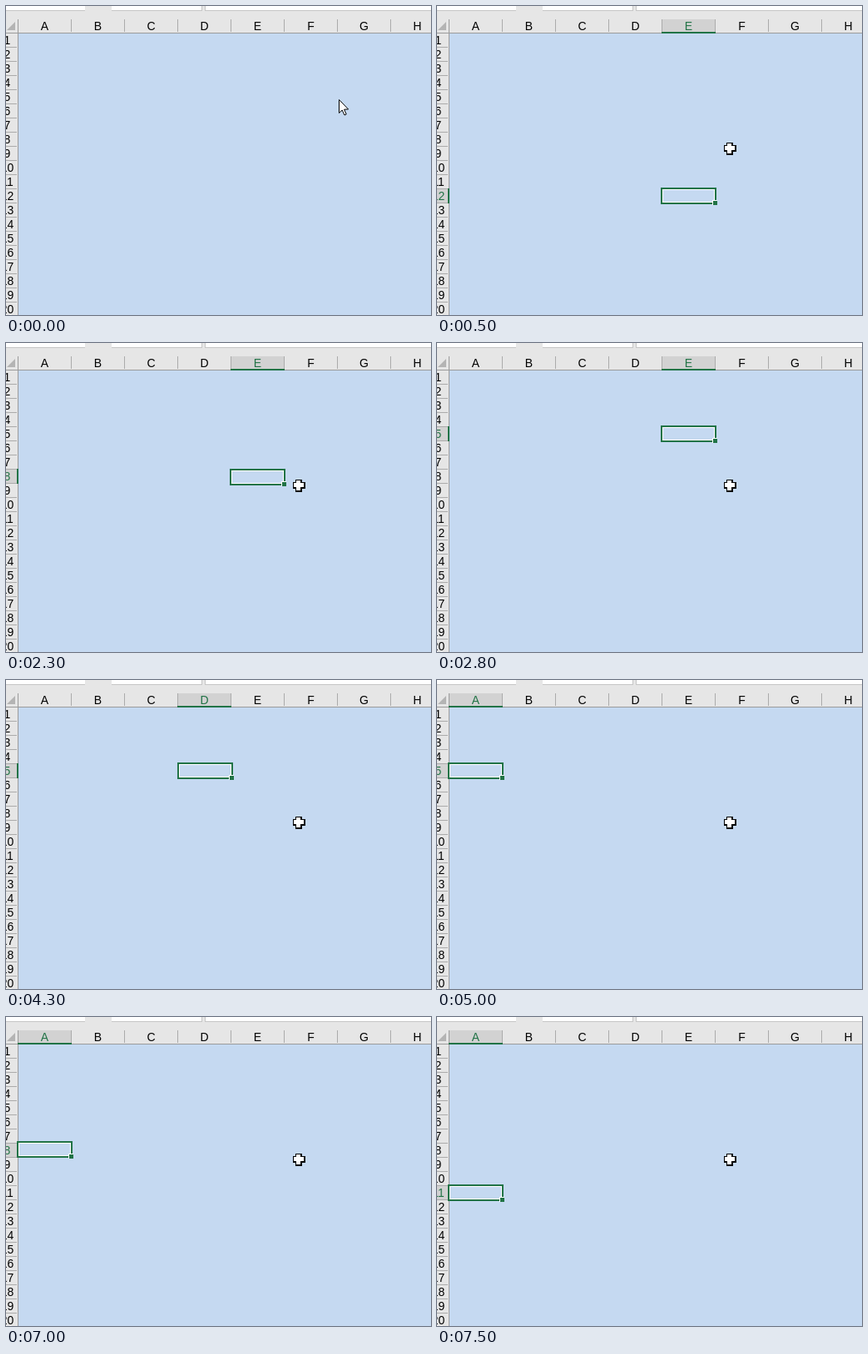
An HTML page with a canvas for the animation above (8000 ms loop, 511 by 371 pixels).

```html
<!DOCTYPE html>
<html lang="en">
<head>
<meta charset="utf-8">
<title>Moving the active cell</title>
<style>
html, body { margin: 0; width: 100%; height: 100%; overflow: hidden; background: #c5d9f1; }
canvas { display: block; }
</style>
</head>
<body>
<canvas id="stage" width="511" height="371"></canvas>
<script>
const ctx = document.getElementById('stage').getContext('2d', { alpha: false });
const LOOP = 8000, COL_W = 64, ROW_H = 17, LEFT = 14, TOP = 32;
const GREEN = '#217346', HEADER = '#e6e6e6', LINE = '#ababab', EDGE = '#9b9b9b';

// Key presses: each selection lands one pixel short, then settles 100 ms later.
const moves = [{ at: 300, col: 4, row: 11, dx: 0, dy: 0 }];
function press(times, dx, dy) {
  for (const at of times) {
    const { col, row } = moves[moves.length - 1];
    moves.push({ at, col: col + dx, row: row + dy, dx, dy });
  }
}
press([1800, 2000, 2200, 2300, 2500, 2600, 2700], 0, -1);
press([4300, 4500, 4700, 4900], -1, 0);
press([6600, 6800, 7000, 7100, 7300, 7400], 0, 1);

const pointer = [
  { at: 0, x: 400, y: 112, arrow: true },
  { at: 100, x: 362, y: 159 },
  { at: 200, x: 308, y: 221 },
  { at: 300, x: 308, y: 221 },
  { at: 400, x: 338, y: 187 },
  { at: 500, x: 352, y: 171 }
];

const current = (steps, t) => steps.filter(s => s.at <= t).pop();
const colX = c => LEFT + c * COL_W;
const rowY = r => TOP + r * ROW_H;

function box(color, x, y, w, h) {
  ctx.fillStyle = color;
  ctx.fillRect(x, y, w, h);
}

function label(text, x, y, color) {
  ctx.fillStyle = color;
  ctx.fillText(text, x, y);
}

function polygon(points) {
  ctx.beginPath();
  points.forEach(([x, y]) => ctx.lineTo(x, y));
  ctx.closePath();
}

function drawSheet(cell) {
  box('#c5d9f1', 0, 0, 511, 371);
  box(HEADER, 0, 0, 511, TOP);
  box(HEADER, 0, TOP, LEFT, 371 - TOP);

  for (const [x, w] of [[0, 95], [127, 109], [240, 271]]) {
    box('#ffffff', x, 0, w, 5);
    box('#c6c6c6', x, 5, w, 1);
  }
  box('#c6c6c6', 235, 0, 1, 6);
  box('#c6c6c6', 239, 0, 1, 6);

  ctx.fillStyle = '#b4b4b4';
  polygon([[11, 19], [11, 29], [1, 29]]);
  ctx.fill();

  box(EDGE, 0, TOP, 511, 1);
  box(EDGE, LEFT, 16, 1, 355);

  ctx.font = '14px "Liberation Sans", Arial, sans-serif';
  ctx.textAlign = 'center';
  for (let c = 0; c < 8; c++) {
    const x = colX(c), active = cell && cell.col === c;
    if (active) {
      box('#d2d2d2', x + 1, 16, COL_W - 1, 15);
      box(GREEN, x, 31, COL_W + 1, 2);
    }
    box(LINE, x + COL_W, 16, 1, 15);
    label('ABCDEFGH'[c], x + 32.5, 29, active ? GREEN : '#000');
  }
  for (let r = 0; r < 20; r++) {
    const y = rowY(r), active = cell && cell.row === r;
    if (active) {
      box('#d2d2d2', 0, y + 1, 13, ROW_H - 1);
      box(GREEN, 13, y, 2, ROW_H + 1);
    }
    box(LINE, 0, y + ROW_H, 13, 1);
    label(r + 1, 1.5, y + 14, active ? GREEN : '#000');
  }
}

function drawSelection(cell, t) {
  const lag = t < cell.at + 100 ? 1 : 0;
  const x = colX(cell.col) - 1 - cell.dx * lag;
  const y = rowY(cell.row) - 1 - cell.dy * lag;
  const w = COL_W + 3, h = ROW_H + 3;
  ctx.lineWidth = 2;
  ctx.strokeStyle = GREEN;
  ctx.strokeRect(x + 1, y + 1, w - 2, h - 2);
  ctx.lineWidth = 1;
  ctx.strokeStyle = '#fff';
  ctx.strokeRect(x + 2.5, y + 2.5, w - 5, h - 5);
  box('#fff', x + w - 5, y + h - 5, 6, 6);
  box(GREEN, x + w - 4, y + h - 4, 5, 5);
}

function drawPointer({ x, y, arrow }) {
  ctx.save();
  ctx.translate(x, y);
  if (arrow) {
    polygon([[.5, .5], [.5, 16.5], [4.2, 13], [7, 19], [9.2, 18], [6.6, 12.2], [11.6, 12]]);
    ctx.fillStyle = '#fff';
    ctx.fill();
    ctx.lineWidth = 1;
    ctx.strokeStyle = '#000';
    ctx.stroke();
  } else {
    box('#000', -7, -4, 15, 8);
    box('#000', -4, -7, 8, 15);
    box('#fff', -6, -3, 12, 5);
    box('#fff', -3, -6, 5, 12);
  }
  ctx.restore();
}

function frame() {
  const t = performance.now() % LOOP;
  const cell = current(moves, t);
  drawSheet(cell);
  if (cell) drawSelection(cell, t);
  drawPointer(current(pointer, t));
  requestAnimationFrame(frame);
}
frame();
</script>
</body>
</html>
```
